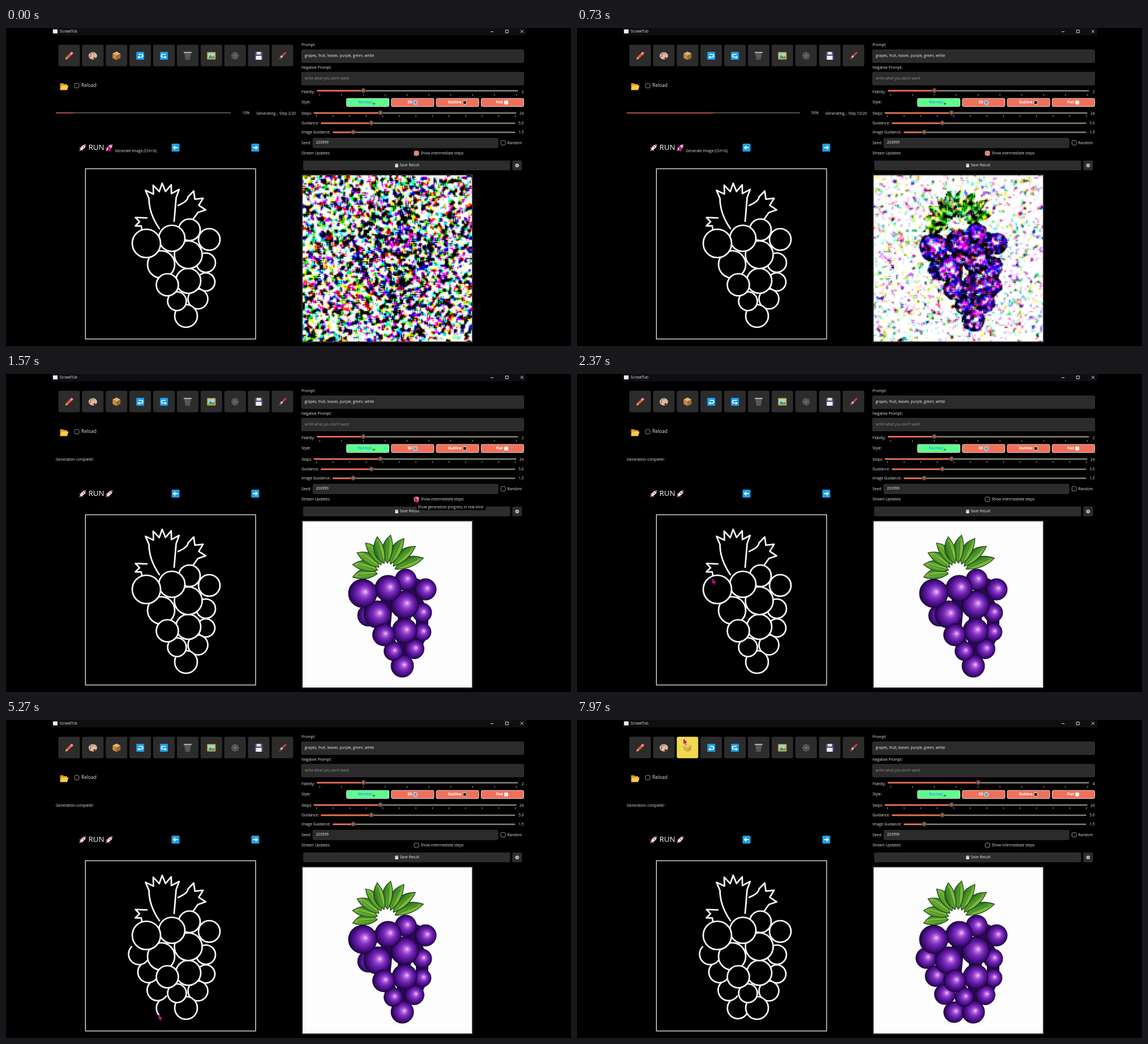
An HTML page with a canvas for the animation above (8 s loop, 998x561 px).

```html
<!DOCTYPE html>
<html lang="en">
<head>
<meta charset="utf-8">
<title>Sketch to image</title>
<style>
html, body { margin: 0; width: 100%; height: 100%; overflow: hidden; background: #000; }
canvas { display: block; width: 998px; height: 561px; }
</style>
</head>
<body>
<canvas id="stage" width="998" height="561"></canvas>
<script>
const LOOP = 8000, TAU = Math.PI * 2;
const FIRST_DONE = 1500, UNCHECK = 1800, RUN_AT = 6730, SECOND_DONE = 7630;
const CORAL = '#f0705a', PANEL = '#2b2b2b', EDGE = '#383838', BLUE = '#1c9fe8', INK = '#e2e2e2';
const IMG = { x: 524, y: 260, w: 299, h: 293 };
const FONT = '"Open Sans", "Noto Sans", sans-serif';
let ctx = document.getElementById('stage').getContext('2d');

const lerp = (a, b, u) => a + (b - a) * u;
const clamp01 = u => Math.max(0, Math.min(1, u));
const ease = u => u * u * (3 - 2 * u);
const rad = d => d * Math.PI / 180;
const polar = (x, y, r, deg) => [x + r * Math.cos(rad(deg)), y + r * Math.sin(rad(deg))];
const range = n => [...Array(n).keys()];

function makeCanvas(w, h) {
  const c = document.createElement('canvas');
  c.width = w; c.height = h;
  return c;
}
function text(s, x, y, size = 6.55, color = INK, align = 'left', weight = 400) {
  ctx.font = `${weight} ${size}px ${FONT}`;
  ctx.textAlign = align;
  ctx.textBaseline = 'middle';
  ctx.fillStyle = color;
  ctx.fillText(s, x, y);
}
function paint(fill, stroke, lw) {
  if (fill) { ctx.fillStyle = fill; ctx.fill(); }
  if (stroke) { ctx.strokeStyle = stroke; ctx.lineWidth = lw; ctx.stroke(); }
}
function box(x, y, w, h, fill, r = 0, stroke, lw = 1) {
  ctx.beginPath();
  ctx.roundRect(x, y, w, h, r);
  paint(fill, stroke, lw);
}
function oval(x, y, rx, ry, fill, stroke, lw = 1) {
  ctx.beginPath();
  ctx.ellipse(x, y, rx, ry, 0, 0, TAU);
  paint(fill, stroke, lw);
}
const disc = (x, y, r, fill, stroke, lw) => oval(x, y, r, r, fill, stroke, lw);
function trace(pts) {
  ctx.beginPath();
  for (let i = 0; i < pts.length; i += 2) ctx.lineTo(pts[i], pts[i + 1]);
}
function poly(pts, fill) { trace(pts); paint(fill); }
function line(pts, color, lw = 1) { trace(pts); paint(null, color, lw); }
function at(x, y, angle, draw) {
  ctx.save();
  ctx.translate(x, y);
  ctx.rotate(rad(angle));
  draw();
  ctx.restore();
}

// ---- icons, each drawn around its centre ----
const tile = () => box(-7, -7, 14, 14, BLUE, 1.5);
function hookArrow(dir) {
  tile();
  ctx.scale(dir, 1);
  ctx.beginPath();
  ctx.moveTo(-3, -2.5);
  ctx.arc(2, 0, 2.5, -Math.PI / 2, Math.PI / 2);
  ctx.lineTo(-2, 2.5);
  paint(null, '#fff', 1.6);
  poly([-1.5, 0, -1.5, 5, -5, 2.5], '#fff');
}
function straightArrow(dir) {
  tile();
  ctx.scale(dir, 1);
  line([-4, 0, 2, 0], '#fff', 2);
  poly([.5, -4, 5, 0, .5, 4], '#fff');
}
function pencil() {
  ctx.rotate(rad(-45));
  box(-5, -2.2, 11, 4.4, '#e8592f');
  box(4, -2.2, 4.5, 4.4, '#ef8f8a', 1);
  poly([-5, -2.2, -9.5, 0, -5, 2.2], '#efc27a');
}
function palette() {
  oval(0, 0, 7.5, 6.5, '#e5b59c');
  oval(3, 4, 2, 1.6, '#2d2d2d');
  ['#c93f4c', '#3f78c8', '#54a354', '#e6b53a'].forEach((c, i) => disc(...polar(0, 0, 4.5, 170 + 50 * i), 1.3, c));
}
function crate() {
  poly([0, -7.5, 7, -4, 0, 0, -7, -4], '#e6b36a');
  poly([-7, -4, 0, 0, 0, 7.5, -7, 4], '#c28a48');
  poly([7, -4, 0, 0, 0, 7.5, 7, 4], '#a06c32');
}
function basket() {
  poly([-6, -6, 6, -6, 4, 7, -4, 7], '#8d8d8d');
  for (let i = -2; i <= 2; i++) {
    line([i * 2.6, -6, i * 1.7, 7], '#303030', .8);
    line([-5.5, i * 2.6, 5.5, i * 2.6], '#303030', .8);
  }
  line([-7, -6, 7, -6], '#ccc', 1.6);
}
function landscape() {
  box(-7.5, -6.5, 15, 13, '#dba548', 1);
  box(-5.5, -4.5, 11, 9, '#9bd6ee');
  poly([-5.5, 4.5, -2, -1.5, 2, 2, 5.5, 0, 5.5, 4.5], '#4c9455');
}
function web() {
  for (let i = 0; i < 4; i++) at(0, 0, i * 45, () => line([-7, 0, 7, 0], '#858585', .7));
  for (const r of [2, 4, 6]) line(range(9).flatMap(i => polar(0, 0, r, i * 45)), '#858585', .7);
}
function floppy(size, body) {
  ctx.scale(size / 14, size / 14);
  box(-7, -7, 14, 14, body, 1);
  box(-4, -7, 8, 5, '#d9d9e0');
  box(-5, 0, 10, 7, '#f2f2f5');
}
function brush() {
  ctx.rotate(rad(-45));
  box(-1, -1.5, 10, 3, '#d63c48', 1.5);
  box(-4, -1.8, 3.5, 3.6, '#c9c9c9');
  poly([-4, -2, -9, .5, -4, 2.2], '#9b5331');
}
const TOOLS = [pencil, palette, crate, () => hookArrow(1), () => hookArrow(-1), basket, landscape, web,
  () => floppy(14, '#55427c'), brush];
function rocket() {
  poly([-2, 4, 2, 4, 0, 9], '#f6a62b');
  poly([0, -2, -5, 5, 5, 5], '#cf2f48');
  oval(0, -1, 2.8, 6.5, '#e6e7ec');
  poly([-2.3, -4.6, 0, -9, 2.3, -4.6], '#d8344c');
  disc(0, -1.5, 1.3, '#3b86c9');
}
function gear() {
  for (let i = 0; i < 4; i++) at(0, 0, i * 45, () => line([-3.6, 0, 3.6, 0], '#c4c4c8', 1.5));
  disc(0, 0, 2.7, '#c4c4c8');
  disc(0, 0, 1.1, '#444');
}

// ---- the bunch, shared by sketch and pictures: x, y, radius, back to front ----
const BUNCH = [
  [359, 373, 19], [324, 356, 19], [353, 414, 17], [353, 448, 16], [339, 478, 17.5],
  [322, 446, 22], [322, 400, 24.5], [318, 508, 20], [302, 482, 16.5], [274, 417, 24],
  [285, 453, 19.5], [293, 371, 23], [248, 380, 25]
];
// four more grapes step down the left edge, drawn one after the other
const ADDED = range(4).map(i => ({
  x: 235 + 16.4 * i, y: 413 + 31.8 * i, r: 18.5, start: 2600 + 820 * i, end: 3080 + 820 * i
}));
const ARC = [225, 35];

// ---- finished pictures ----
function leaf(i) {
  const u = i / 8, angle = lerp(172, 339, u), len = lerp(44, 54, u);
  at(...polar(672, 350, 16, angle), angle, () => {
    const g = ctx.createLinearGradient(0, -9, 0, 9);
    ['#2f7423', '#4f9a2c', '#85bf3c', '#3f8728'].forEach((c, k) => g.addColorStop(k / 3, c));
    const bend = 6 * Math.sign(u - .4);
    ctx.beginPath();
    ctx.moveTo(0, 0);
    ctx.quadraticCurveTo(len * .5, 18 - bend, len, 0);
    ctx.quadraticCurveTo(len * .5, -18 - bend, 0, 0);
    paint(g, '#173f14', 1.2);
    line([0, 0, len * .8, -bend / 3], '#2a6420', .8);
  });
}
function grape([x, y, r]) {
  ctx.save();
  ctx.translate(x, y);
  ctx.scale(r, r);
  const g = ctx.createRadialGradient(.2, -.12, 0, .05, 0, 1);
  ['#ecc8f6', '#b468dc', '#8434c0', '#661ca6', '#450f84', '#250648'].forEach((c, i) => g.addColorStop(i / 5, c));
  disc(0, 0, 1, g, '#1d0638', .05);
  ctx.restore();
}
function picture(extra) {
  const c = makeCanvas(IMG.w, IMG.h), outer = ctx;
  ctx = c.getContext('2d');
  ctx.fillStyle = '#fdfdfd';
  ctx.fillRect(0, 0, IMG.w, IMG.h);
  ctx.translate(-IMG.x, -IMG.y);
  // outer leaves first, so the middle ones lie in front
  range(9).sort((a, b) => Math.abs(b - 4) - Math.abs(a - 4)).forEach(leaf);
  ctx.translate(382, 7);
  ctx.lineJoin = 'round';
  line(BUNCH.flatMap(([x, y]) => [x, y]), '#2a0a52', 22);
  [...extra, ...BUNCH].forEach(grape);
  ctx.lineJoin = 'miter';
  ctx = outer;
  return c;
}
const pictureA = picture([[258, 419, 19]]);
const pictureB = picture(ADDED.map(a => [a.x, a.y, a.r]));

// ---- denoising previews ----
const NW = 150, NH = 147;
let seed = 203999;
function random() {
  seed = seed + 0x6D2B79F5 | 0;
  let v = Math.imul(seed ^ seed >>> 15, 1 | seed);
  v = v + Math.imul(v ^ v >>> 7, 61 | v) ^ v;
  return ((v ^ v >>> 14) >>> 0) / 4294967296;
}
// white noise under a 3 by 3 blur, scaled to unit deviation
function field() {
  const src = new Float32Array(NW * NH).map(() => random() * 2 - 1);
  return src.map((_, i) => {
    const x = i % NW, y = i / NW | 0;
    let sum = 0;
    for (let dy = -1; dy < 2; dy++)
      for (let dx = -1; dx < 2; dx++)
        sum += src[(y + dy + NH) % NH * NW + (x + dx + NW) % NW];
    return sum / Math.sqrt(3);
  });
}
const shared = field(), tints = range(3).map(field);
const small = makeCanvas(NW, NH).getContext('2d', { willReadFrequently: true });
small.drawImage(pictureA, 0, 0, NW, NH);
const clean = small.getImageData(0, 0, NW, NH).data;
const previews = {};
function preview(step) {
  if (previews[step]) return previews[step];
  const p = (step - 2) / 18, early = clamp01(p / .44), late = clamp01((p - .44) / .56);
  const gain = late ? lerp(1.6, 1, late) : lerp(.7, 1.6, early);
  const sigma = late ? lerp(125, 0, late) : lerp(330, 125, early);
  const c = makeCanvas(NW, NH), g = c.getContext('2d'), out = g.createImageData(NW, NH);
  for (let i = 0; i < NW * NH; i++) {
    for (let k = 0; k < 3; k++)
      out.data[i * 4 + k] = 128 + (clean[i * 4 + k] - 128) * gain
        + sigma * (.83 * shared[i] + .56 * tints[k][i]);
    out.data[i * 4 + 3] = 255;
  }
  g.putImageData(out, 0, 0);
  return previews[step] = c;
}

// ---- sketch ----
// spiky leaf: n tips at radius R between two angles, valleys at radius r
function frond(x0, y0, x1, y1, cx, cy, a0, a1, n, R, r) {
  const last = 2 * n - 1;
  const edge = range(last + 2).map(k => polar(cx, cy, k % 2 ? R : r, lerp(a0, a1, (k - 1) / (last - 1))));
  const [sx, sy] = edge[0];
  ctx.beginPath();
  ctx.moveTo(x0, y0);
  ctx.quadraticCurveTo(sx, (y0 + sy) / 2, sx, sy);
  edge.forEach(p => ctx.lineTo(...p));
  ctx.lineTo(x1, y1);
  paint(null, '#fff', 2.7);
}
function sketch(t) {
  box(140.3, 248.3, 300.6, 300.4, '#000', 0, '#f4f4f4', 1.3);
  ctx.lineCap = ctx.lineJoin = 'round';
  frond(271, 354, 297, 341, 277, 318, 226, 311, 5, 44, 30);
  frond(304, 313, 330, 338, 322, 317, 288, 367, 3, 31, 19);
  frond(249, 335, 240, 356, 246, 342, 204, 158, 2, 19, 10);
  for (const a of ADDED) {
    if (t <= a.start) continue;
    const u = clamp01((t - a.start) / (a.end - a.start));
    ctx.beginPath();
    ctx.arc(a.x, a.y, a.r, rad(ARC[0]), rad(lerp(...ARC, u)), true);
    paint(null, '#fff', 2.7);
  }
  BUNCH.forEach(g => disc(...g, '#000', '#fff', 2.7));
  ctx.lineCap = 'butt';
  ctx.lineJoin = 'miter';
}

// ---- pointer ----
function pointerAt(t) {
  let pos = [180, 207];
  const go = (t0, t1, x, y) => {
    const u = ease(clamp01((t - t0) / (t1 - t0)));
    pos = [lerp(pos[0], x, u), lerp(pos[1], y, u)];
  };
  go(880, 1400, 722, 217);
  go(1950, 2370, 239, 361);
  for (const a of ADDED) {
    go(a.start - 200, a.start, ...polar(a.x, a.y, a.r, ARC[0]));
    if (t > a.start) pos = polar(a.x, a.y, a.r, lerp(...ARC, clamp01((t - a.start) / (a.end - a.start))));
  }
  go(5620, 5870, 631, 111);
  go(5920, 6120, 709, 111);
  go(6170, 6430, 274, 226);
  go(6430, 6600, 168, 210);
  go(7640, 7930, 188, 33);
  return pos;
}

// ---- window ----
function slider(label, labelY, value, y, x0, x1, knob) {
  text(label, 522, labelY);
  text(value, 914.5, labelY, 6.55, INK, 'right');
  box(x0, y - 1.2, x1 - x0, 2.4, '#858378', 1);
  box(x0, y - 1.2, knob - x0, 2.4, CORAL, 1);
  disc(knob, y - .5, 4.2, '#54453f');
  disc(knob, y - .5, 2.3, '#a3695d');
}
function ticks(x, step, count, y) {
  for (let i = 0; i < count; i++) box(x + i * step - .4, y, .9, 3, '#b5b5b5');
}
function checkbox(x, y, on) {
  box(x - 4, y - 4, 8, 8, on ? '#ee7f72' : '#050505', 2, on ? '#d9a39b' : '#9a9a9a', .9);
}
function field2(label, labelY, x, y, w, h, value, color) {
  text(label, 522, labelY);
  box(x, y, w, h, PANEL, 2, EDGE, .8);
  text(value, x + 5.5, y + h / 2 - .3, 6.5, color);
}
function styleButtons() {
  ['Normal', '3D', 'Outline', 'Flat'].forEach((label, i) => {
    const x = 601.5 + 79.3 * i;
    box(x, 124.2, 75, 14.4, i ? CORAL : '#5bff8f', 2, '#e9d9cf', 1);
    text(label, x + 32.5, 131.5, 6.5, i ? '#fff' : '#2fa9dc', 'center', 700);
    const end = x + 32.5 + ctx.measureText(label).width / 2;
    if (i) box(end + 2.5, 128.4, 6, 6, ['', '#2fa7ea', '#111', '#fff'][i], 1, '#fff', .9);
    else oval(end + 3.5, 133.5, 2.6, 1.7, '#4f9a1c');
  });
}
function toolbar([px, py]) {
  TOOLS.forEach((icon, i) => {
    const x = 93 + i * 41.87;
    const hot = px > x && px < x + 37 && py > 30 && py < 67;
    box(x, 30, 37, 37, hot ? '#f0d94f' : '#2c2c2c', 2, hot ? '#f7e67c' : '#343434', .8);
    ctx.globalAlpha = hot ? .45 : 1;
    at(x + 18.5, 49, 0, icon);
    ctx.globalAlpha = 1;
  });
}
function currentStep(t) {
  if (t < FIRST_DONE) return Math.min(20, 2 + Math.floor(t / 83));
  if (t >= RUN_AT && t < SECOND_DONE) return 1 + 7 * Math.floor((t - RUN_AT) / 300);
  return 0;
}
function status(step) {
  if (!step) return text('Generation complete!', 88, 151);
  const label = `Generating... Step ${step}/20`, percent = step * 5 + '%';
  text(label, 512, 151, 6.55, INK, 'right');
  const end = 512 - ctx.measureText(label).width - 12;
  text(percent, end, 150.5, 6.55, INK, 'right');
  const width = end - ctx.measureText(percent).width - 20 - 88;
  box(88, 149, width, 1.3, '#807c7a');
  box(88, 148.9, width * step / 20, 1.5, '#dc6258');
}
function leftSide(t, step, mouse) {
  toolbar(mouse);
  poly([95.5, 97.5, 101, 97.5, 102.5, 99, 108, 99, 108, 109, 95.5, 109], '#d99a1f');
  poly([98, 101.5, 110.5, 101.5, 108, 109.5, 95.5, 109.5], '#fbcb45');
  checkbox(125, 101.7, false);
  text('Reload', 133, 102.3, 8.4);
  status(step);
  text('RUN', 145.5, 211.3, 13.3, '#fff');
  at(135.5, 211, 45, rocket);
  at(182.5, 211, 45, rocket);
  at(299.5, 211, 0, () => straightArrow(-1));
  at(440.3, 211, 0, () => straightArrow(1));
  sketch(t);
}
function rightSide(t, step) {
  field2('Prompt:', 30.5, 522, 38.5, 392.5, 22.5, 'grapes, fruit, leaves. purple, green, white', '#f0f0f0');
  field2('Negative Prompt:', 70, 522, 78, 392.5, 22.5, "write what you don't want", '#8f8f8f');

  const fidelity = Math.round(lerp(2, 4, clamp01((t - 5920) / 200)));
  slider('Fidelity:', 113, fidelity, 110.7, 549, 904.5, 553.4 + 38.9 * fidelity);
  ticks(554, 38.6, 10, 116.5);
  text('Style:', 522, 131.7);
  styleButtons();
  slider('Steps:', 150.8, '24', 150, 543.5, 901.5, 661.5);
  ticks(548.5, 29.25, 13, 154);
  slider('Guidance:', 168.3, '5.0', 168, 556, 899.5, 645.3);
  slider('Image Guidance:', 184.5, '1.5', 184, 577, 899.5, 613.3);

  field2('Seed:', 203, 542, 194.3, 327, 17, '203999', '#f0f0f0');
  checkbox(878.2, 202.5, false);
  text('Random', 885.5, 203);
  text('Stream Updates:', 522, 221);
  checkbox(725, 221, t < UNCHECK);
  text('Show intermediate steps', 732.5, 221.2);
  box(525, 233.7, 365.5, 17.3, '#2d2d2d', 2);
  at(690, 242.5, 0, () => floppy(6, '#a8a0bd'));
  text('Save Result', 695.5, 242.6);
  box(894.3, 233.7, 17, 17.3, '#2d2d2d', 2);
  at(902.8, 242.5, 0, gear);

  box(523, 259, 301, 295, '#000', 0, '#555', 1);
  const img = t >= SECOND_DONE ? pictureB : t < FIRST_DONE ? preview(step) : pictureA;
  ctx.drawImage(img, IMG.x, IMG.y, IMG.w, IMG.h);
}
function titleBar() {
  box(81, 0, 838, 13, '#0e0f10');
  box(83, 2.5, 8, 7, '#f0f0f0');
  text('ScrawlTub', 95, 6.2);
  line([856, 6.5, 861, 6.5], '#eee', .9);
  box(882.3, 3.5, 5, 5, null, 0, '#eee', .9);
  for (const angle of [45, -45]) at(911.4, 6, angle, () => line([-3.6, 0, 3.6, 0], '#eee', .9));
}
function hint(label, x, y, w) {
  box(x - 2, y - 5, w + 4, 10, '#000');
  text(label, x, y);
}
function draw(t) {
  const mouse = pointerAt(t), step = currentStep(t);
  ctx.fillStyle = '#000';
  ctx.fillRect(0, 0, 998, 561);
  titleBar();
  leftSide(t, step, mouse);
  rightSide(t, step);
  if (t < 900 || t > 7000 && t < 7650) hint('Generate Image (Ctrl+G)', 192.5, 217.3, 75);
  if (t > 1480 && t < 1980) hint('Show generation progress in real-time', 727.3, 235.3, 118);
  at(...mouse, 0, () => poly([0, 0, 0, 9.5, 2.2, 7.6, 3.8, 11, 5.3, 10.3, 3.9, 7, 6.8, 6.8], '#cf0a9c'));
}
const start = performance.now();
function frame() {
  draw((performance.now() - start) % LOOP);
  requestAnimationFrame(frame);
}
frame();
</script>
</body>
</html>
```
